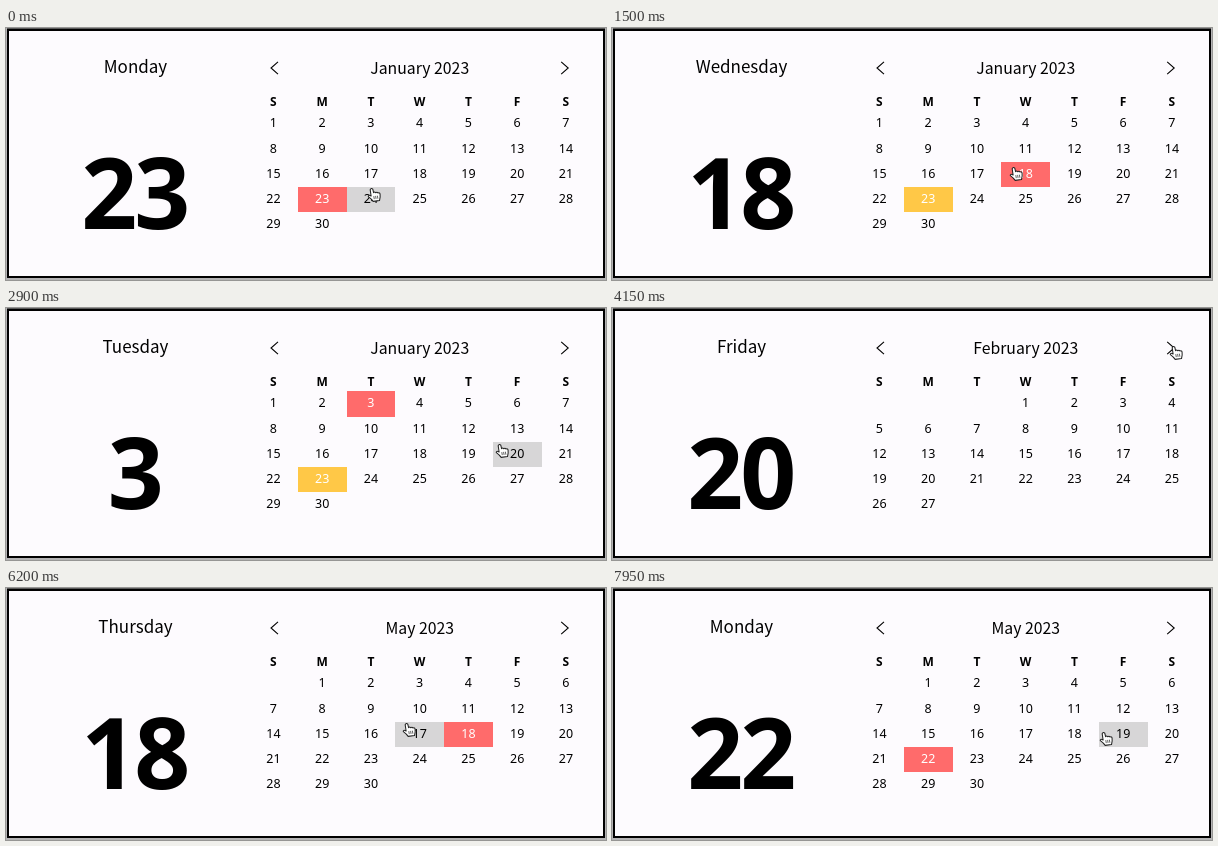
Animation, 600 px wide and 252 px high, one loop 8000 ms. Source, as an HTML page with a canvas:

```html
<!DOCTYPE html>
<html lang="en">
<head>
<meta charset="utf-8">
<title>Calendar</title>
<style>
html, body { margin: 0; width: 100%; height: 100%; overflow: hidden; background: #fdfbfe; }
canvas { display: block; width: 600px; height: 252px; }
</style>
</head>
<body>
<canvas id="stage" width="600" height="252"></canvas>
<script>
const ctx = document.getElementById('stage').getContext('2d');
const LOOP = 8000;
const DIGITS = '"Noto Sans", "Open Sans", sans-serif';
const WORDS = '"Noto Sans CJK KR", "Noto Sans CJK JP", "Noto Sans CJK SC", "Noto Sans", sans-serif';
const INK = '#000', RED = '#ff6b6b', YELLOW = '#ffc847', GRAY = '#d7d6d7', PAPER = '#fdfbfe';
const GRID = { x: 243, y: 83.4, w: 48.75, h: 25.25 };

// first weekday column and number of days listed
const MONTHS = [
  { name: 'January', first: 0, days: 30 },
  { name: 'February', first: 3, days: 27 },
  { name: 'March', first: 3, days: 30 },
  { name: 'April', first: 6, days: 29 },
  { name: 'May', first: 1, days: 30 }
];
const TODAY = { month: 0, day: 23 };

const monthSteps = [[0, 0], [4000, 1], [4450, 2], [4800, 3], [5100, 4]];
const picks = [
  [0, { month: 0, day: 23, name: 'Monday' }],
  [1250, { month: 0, day: 18, name: 'Wednesday' }],
  [2100, { month: 0, day: 3, name: 'Tuesday' }],
  [2950, { month: 0, day: 20, name: 'Friday' }],
  [5850, { month: 4, day: 18, name: 'Thursday' }],
  [6550, { month: 4, day: 9, name: 'Tuesday' }],
  [7500, { month: 4, day: 22, name: 'Monday' }]
];

// pointer moves: start, end, x, y
const home = { x: 366, y: 160 };
const moves = [
  [700, 1150, 402, 139],
  [1600, 2000, 352, 104],
  [2380, 2720, 494, 136],
  [3130, 3850, 562, 38],
  [5320, 5620, 450, 140],
  [5920, 6200, 401, 135],
  [6200, 6450, 379, 114],
  [6680, 7300, 320, 160],
  [7580, 7950, 492, 144]
];

const ease = p => p * p * (3 - 2 * p);
const latest = (list, t) => list.filter(e => e[0] <= t).pop()[1];

function pointerAt(t) {
  let { x, y } = home;
  for (const [start, end, tx, ty] of moves) {
    if (t < start) break;
    const p = ease(Math.min(1, (t - start) / (end - start)));
    x += (tx - x) * p;
    y += (ty - y) * p;
  }
  return { x, y };
}

function text(str, x, y, font, color = INK) {
  ctx.font = font;
  ctx.fillStyle = color;
  ctx.fillText(str, x, y);
}

function chevron(x, dir) {
  ctx.beginPath();
  ctx.moveTo(x - 3.5 * dir, 33.8);
  ctx.lineTo(x + 3.5 * dir, 40);
  ctx.lineTo(x - 3.5 * dir, 46.2);
  ctx.strokeStyle = INK;
  ctx.lineWidth = 1.1;
  ctx.stroke();
}

function drawFrame() {
  ctx.fillStyle = '#b5b4b5';
  ctx.fillRect(0, 0, 600, 252);
  ctx.fillStyle = INK;
  ctx.fillRect(1, 0.5, 598, 249.5);
  ctx.fillStyle = PAPER;
  ctx.fillRect(3, 3, 594, 245);
}

function drawBigDay(day) {
  ctx.letterSpacing = '-3px';
  text(day, 128.2, 201, `600 98px ${DIGITS}`);
  ctx.letterSpacing = '0px';
}

function drawDays(month, picked, pointer) {
  const { first, days } = MONTHS[month];
  const is = (d, day) => d.month === month && d.day === day;
  const edgeX = c => Math.round(GRID.x + c * GRID.w);
  const edgeY = r => Math.round(GRID.y + r * GRID.h);
  for (let day = 1; day <= days; day++) {
    const col = (first + day - 1) % 7;
    const row = Math.floor((first + day - 1) / 7);
    const x = edgeX(col), w = edgeX(col + 1) - x;
    const y = edgeY(row), h = edgeY(row + 1) - y;
    const hover = pointer.x >= x && pointer.x < x + w &&
                  pointer.y >= y && pointer.y < y + h;
    const mark = is(picked, day) ? RED : is(TODAY, day) ? YELLOW : null;
    const fill = mark || (hover ? GRAY : null);
    if (fill) {
      ctx.fillStyle = fill;
      ctx.fillRect(x, y, w, h);
    }
    text(day, GRID.x + (col + 0.5) * GRID.w, GRID.y + row * GRID.h + 16,
         `500 12.5px ${DIGITS}`, mark ? '#fff' : INK);
  }
}

function drawHand({ x, y }) {
  ctx.save();
  ctx.translate(x - 0.7, y);
  ctx.rotate(-0.12);
  ctx.scale(0.95, 0.95);
  ctx.beginPath();
  ctx.moveTo(-1.4, 1.6);
  ctx.quadraticCurveTo(0, -0.6, 1.4, 1.4);
  ctx.lineTo(1.8, 5.2);
  ctx.quadraticCurveTo(3, 4, 4, 5.5);
  ctx.quadraticCurveTo(5.5, 4.6, 6.3, 6.1);
  ctx.quadraticCurveTo(8.4, 5.6, 8.4, 7.6);
  ctx.quadraticCurveTo(8.5, 10.5, 7, 14.2);
  ctx.lineTo(0.3, 14.2);
  ctx.quadraticCurveTo(-1.2, 11.5, -4.2, 8.7);
  ctx.quadraticCurveTo(-4.4, 6.3, -1.2, 8.3);
  ctx.closePath();
  ctx.fillStyle = '#fff';
  ctx.strokeStyle = '#222';
  ctx.lineWidth = 1.1;
  ctx.lineJoin = 'round';
  ctx.fill();
  ctx.stroke();
  ctx.beginPath();
  for (const fx of [1.6, 3.5, 5.4]) {
    ctx.moveTo(fx, 8.8);
    ctx.lineTo(fx + 0.1, 12);
  }
  ctx.lineWidth = 0.7;
  ctx.stroke();
  ctx.restore();
}

function draw(t) {
  const month = latest(monthSteps, t);
  const picked = latest(picks, t);
  const pointer = pointerAt(t);
  ctx.textAlign = 'center';
  drawFrame();
  text(picked.name, 129.5, 44.5, `400 17px ${WORDS}`);
  drawBigDay(picked.day);
  text(MONTHS[month].name + ' 2023', 413.7, 45.5, `400 15.8px ${WORDS}`);
  chevron(268.5, -1);
  chevron(558.7, 1);
  [...'SMTWTFS'].forEach((d, i) =>
    text(d, GRID.x + (i + 0.5) * GRID.w, 78.2, `700 12px ${DIGITS}`));
  drawDays(month, picked, pointer);
  drawHand(pointer);
}

const began = performance.now();
function tick() {
  draw((performance.now() - began) % LOOP);
  requestAnimationFrame(tick);
}
tick();
</script>
</body>
</html>
```
